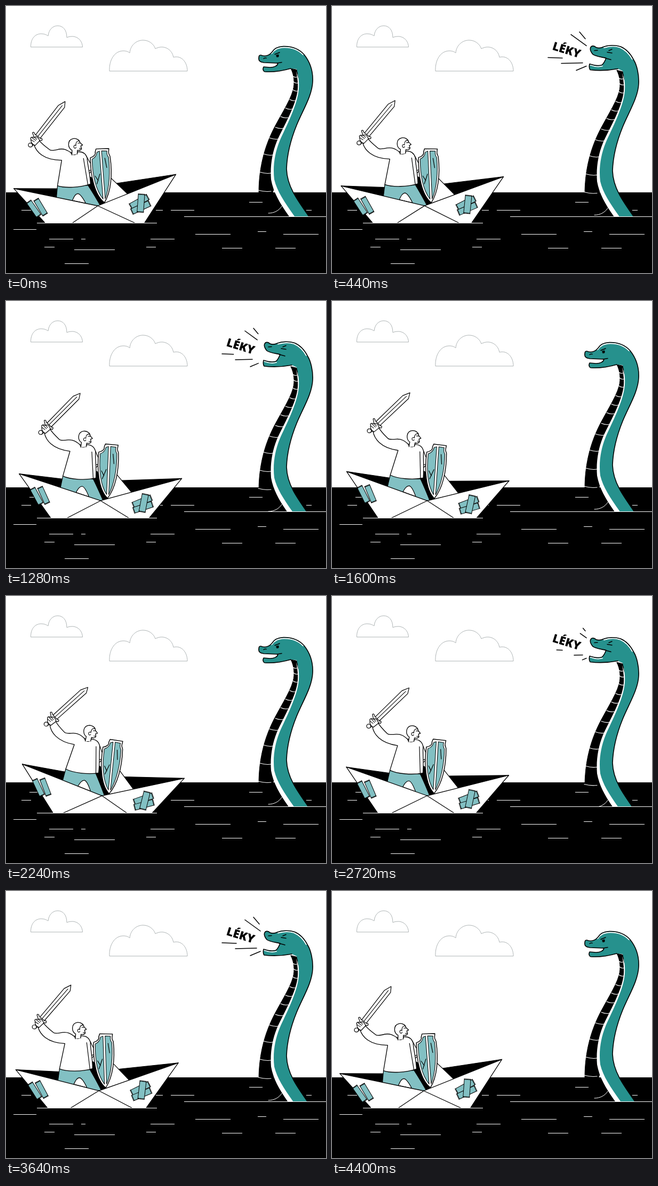
An HTML page with a canvas for the animation above (4440 ms loop, 600 by 500 pixels).

```html
<!DOCTYPE html>
<html lang="cs">
<head>
<meta charset="utf-8">
<title>Paper boat and sea serpent</title>
<style>
html, body { margin: 0; width: 100%; height: 100%; overflow: hidden; background: #fff; }
canvas { display: block; width: 600px; height: 500px; }
</style>
</head>
<body>
<canvas id="stage"></canvas>
<script>
const LOOP = 4440, STEP = 40;
const TEAL = '#26918d', PALE = '#82c0c3', INK = '#000', PAPER = '#fff';

const canvas = document.getElementById('stage');
const dpr = window.devicePixelRatio || 1;
canvas.width = 600 * dpr;
canvas.height = 500 * dpr;
const ctx = canvas.getContext('2d');

function shape(d, fill, stroke, width = 1.4) {
  const p = new Path2D(d);
  if (fill) { ctx.fillStyle = fill; ctx.fill(p); }
  if (stroke) { ctx.strokeStyle = stroke; ctx.lineWidth = width; ctx.stroke(p); }
}
const line = (d, width, color = INK) => shape(d, null, color, width);

function clipAbove(y) {
  ctx.beginPath();
  ctx.rect(0, 0, 600, y);
  ctx.clip();
}

// --- timing ---
function bezierEase(x1, x2, p) {
  let lo = 0, hi = 1, s = p;
  for (let i = 0; i < 24; i++) {
    s = (lo + hi) / 2;
    const x = 3 * x1 * s * (1 - s) ** 2 + 3 * x2 * s * s * (1 - s) + s ** 3;
    if (x < p) lo = s; else hi = s;
  }
  return s * s * (3 - 2 * s);
}

function boatAngle(t) {
  const half = LOOP / 2;
  const k = bezierEase(0.167, 0.69, (t % half) / half);
  return (t < half ? k * 10 - 5 : 5 - k * 10) * Math.PI / 180;
}

const BOB_KEYS = [0, 960, 1920, 2880, 4400];
function bob(t) {
  for (let i = 0; i < 4; i++) {
    if (t <= BOB_KEYS[i + 1]) {
      const p = (t - BOB_KEYS[i]) / (BOB_KEYS[i + 1] - BOB_KEYS[i]);
      const c = 4 * Math.cos(Math.PI * p);
      return i % 2 ? 4 + c : 4 - c;
    }
  }
  return 0;
}

// Time since the roar began, or -1 while the mouth is shut
function roarTime(t) {
  for (const start of [240, 2640]) {
    if (t >= start && t < start + 1200) return t - start;
  }
  return -1;
}

// --- scenery ---
const WAVES = [
  [29, 47, 382], [44, 64, 367], [281, 294, 382], [309, 353, 382], [456, 481, 367],
  [563, 573, 382], [14, 57, 418], [81, 126, 436], [141, 149, 436], [72, 91, 451],
  [128, 204, 456], [110, 155, 482], [271, 316, 436], [263, 281, 451], [355, 421, 427],
  [472, 488, 422], [520, 586, 427], [405, 443, 453], [505, 543, 453]
];

function drawScenery() {
  const grey = '#aeb4b5';
  line('M46.5 76.5C46 62 54 52 66 52C72 52 76 54 79 56C80 45 87 37 97 37C107 37 114 45 114 59C118 57 122 57 126 57C136 58 143 66 143.5 76.5Z', 1, grey);
  line('M194 121.5C193 102 203 84 220 84C226 84 230 86 232 88C233 74 244 64 257 64C268 64 277 71 280 80C295 72 311 80 314 96C328 92 340 104 340 121.5Z', 1, grey);
  ctx.fillStyle = INK;
  ctx.fillRect(0, 349, 600, 151);
  ctx.fillStyle = PAPER;
  for (const [a, b, y] of WAVES) ctx.fillRect(a, y, b - a, 1);
}

// --- boat and sailor ---
// Torn tape: a rectangle with zigzag short ends
function strip(x, y, w, h, deg) {
  ctx.save();
  ctx.translate(x, y);
  ctx.rotate(deg * Math.PI / 180);
  const n = 10;
  let d = '';
  for (const side of [-1, 1]) {
    for (let i = 0; i <= n; i++) {
      const px = side * (i / n - 0.5) * w;
      const py = side * (h / 2 - (i % 2) * 1.8);
      d += `${d ? 'L' : 'M'}${px} ${py}`;
    }
  }
  shape(d + 'Z', PALE, INK, 1);
  ctx.restore();
}

function drawSailor() {
  shape('M104 330L162 334L181 374L156 374L153 365C149 356 145 349 141 348C136 348 133 353 129 361L99 358Z', PALE, INK, 1.2);
  shape('M161 335L166 318L173 322L190 369L181 373Z', INK);
  shape('M158 275C165 278 167 292 170 294L171 306L165 307', PAPER, INK, 1.2);
  // sword
  shape('M71 232L119 180L132 174L130 185L79 239Z', PAPER, INK, 1.2);
  line('M75 235L126 181', 1);
  shape('M67 241L58 250L62 253L71 245Z', PAPER, INK, 1.2);
  ctx.beginPath();
  ctx.arc(60, 249.5, 3.8, 0, 7);
  ctx.fillStyle = PAPER;
  ctx.fill();
  ctx.stroke();
  shape('M66 227C68 225 70 227 70 230L80 239C83 238 84 241 82 243L76 242L68 235Z', PAPER, INK, 1.2);
  // shirt with raised arm
  shape('M67 250C70 263 82 280 116 283L104 330C118 336 146 337 166 332C167 312 163 292 164 283C162 274 156 270 148 270L134 270C128 265 122 261 112 262C106 263 99 264 96 262C88 255 82 250 77 242Z', PAPER, INK, 1.3);
  line('M157 283L161 333M134 270C136 277 146 276 147 270', 1.2);
  shape('M62 239C60 236 64 234 67 236L72 235C75 236 77 239 78 243L69 251C63 249 61 243 62 239Z', PAPER, INK, 1.2);
  line('M62 240L68 244M64 236L71 242M68 235L73 240', 1);
  // head
  shape('M136 275L137 266C129 262 129 246 141 244.5C148 244 153 249 153 253L157.5 258L154 259.5L155 265C153 268 150 268 147 267L146 274', PAPER, INK, 1.3);
  line('M152 250C147 249 145 253 145 258C143 256 140 258 141 261C142 264 145 263 145 261M149 254L153 254M151 264L155 264', 1.1);
}

function drawShield() {
  shape('M182 267.5L206 269L205 275C204 279 207 282 207 284C209 318 203 350 189 369C172 354 167 316 170 283C176 282 181 278 180 273Z', PAPER, INK, 1.4);
  shape('M183 274C182 280 178 284 173 286C171 316 175 345 187 362L188 272Z', PALE, INK, 1);
  shape('M192 272L202 273C201 278 202 282 204 285C205 312 201 342 191 362Z', PALE, INK, 1);
  line('M185 315L178 333M176 318L181 327M197 286L199 304', 1.2);
}

function drawBoat(angle) {
  ctx.save();
  clipAbove(406);
  ctx.translate(177, 419);
  ctx.rotate(angle);
  ctx.translate(-177, -419);
  shape('M22 328L110 336L215 335L327 328L176 374Z', INK, INK, 1.2);
  shape('M181 297L234 357L176 374L120 357Z', PAPER, INK, 1.2);
  drawSailor();
  shape('M22 328L176 374L327 328L243 436H104Z', PAPER, INK, 1.3);
  line('M82 426L176 374L267 426', 1.2);
  drawShield();
  strip(56, 369, 10, 34, -30);
  strip(69, 367, 10, 34, -26);
  strip(254, 373, 11, 38, 66);
  strip(256, 384, 11, 38, 70);
  strip(257, 376, 12, 35, 9);
  ctx.restore();
  ctx.fillStyle = PAPER;
  ctx.fillRect(58, 406, 225, 1);
}

// --- serpent ---
const BACK = 'C571 106 576 124 575 142C574 168 556 196 545 223C534 250 527 275 526 305C527 338 545 362 575 404';
const FRONT = 'H548C525 371 509 350 503 325C500 300 504 275 513 253C524 228 547 185 549 155C550 140 548 130 545 118Z';
const BELLY = 'M534 117C540 128 542 145 538 158C532 180 510 212 498 238C482 272 474 310 474 349L500 349L507 330C500 300 505 275 515 253C526 228 549 185 549 155L546 120Z';
const GAP = 'M544 122C545 130 548 140 547 155C545 185 520 226 508 253C499 275 495 300 497 325C502 352 515 372 538 404L550 404L520 320L530 240L555 160Z';
const SHUT = 'M534 117C520 121 500 124 485 123C482 122 481 118 483 114L495 115C503 115 509 112 510 107L484 106C477 105 473 103 474 97C474 92 476 91 481 93C490 95 495 91 499 86C503 79 509 76 520 75.5C540 75 551 82 559 91';
const OPEN = 'M536 114C520 117 500 118 484 116C482 113 482 109 483 105C492 108 500 109 506 107C510 104 512 99 514 94C505 92 494 91 489 87C485 82 483 78 485 74C487 70 492 71 495 74C500 76 505 75 509 73C517 70 530 69 541 72.5C552 77 560 86 566 98';

// left x, y, width
const SCALES = [
  [537, 131, 9], [539, 142, 9], [538, 157, 10], [532, 175, 12], [524, 191, 13], [515, 207, 14],
  [505, 227, 16], [494, 247, 18], [483, 277, 18], [476, 311, 21], [473, 345, 24]
];

// inner end, outer end
const SPARKS = [
  [475, 58, 464, 45], [477, 71, 448, 50], [432, 94, 405, 93],
  [470, 103, 430, 104], [477, 109, 458, 117]
];

function drawShout() {
  const word = 'LÉKY', room = 54;
  const setSize = px => { ctx.font = `800 ${px}px "Open Sans", "Noto Sans", sans-serif`; };
  ctx.save();
  ctx.translate(412, 78);
  ctx.rotate(0.3);
  ctx.fillStyle = INK;
  ctx.fontStretch = 'condensed';
  setSize(28);
  // a regular-width face needs a smaller size to fit
  const width = ctx.measureText(word).width;
  if (width > room) setSize(28 * room / width);
  ctx.fillText(word, 0, 0);
  ctx.restore();
}

function drawRoar(time) {
  const k = (time % 400) / 200;
  const from = Math.max(0, k - 1), to = Math.min(1, k);
  if (to > from) {
    for (const [x, y, X, Y] of SPARKS) {
      const at = s => (x + (X - x) * s) + ' ' + (y + (Y - y) * s);
      line('M' + at(from) + 'L' + at(to), 1.5);
    }
  }
  drawShout();
}

function drawSerpent(t) {
  const roar = roarTime(t);
  const head = roar < 0 ? SHUT : OPEN;
  ctx.save();
  clipAbove(394);
  ctx.translate(0, bob(t));
  shape(BELLY, INK, INK, 1);
  for (const [x, y, w] of SCALES) {
    line(`M${x} ${y}Q${x + w / 2} ${y + 3.5} ${x + w} ${y + 2}`, 1.1, PAPER);
  }
  line('M492 388C503 388 512 383 517 375', 1, PAPER);
  shape(GAP, PAPER);
  shape(head + BACK + FRONT, TEAL);
  if (roar < 0) {
    shape('M477 105.5L511 107C509 112 503 115 495 115L483 114L482 107Z', PAPER);
    line('M498 89C504 81 510 78 521 77.5C539 77 549 83 557 91', 2, PAPER);
  } else {
    line('M510 74.5C520 71.5 531 71 540 74C551 79 558 87 563 96', 2, PAPER);
    line('M484 107C492 110 500 111 507 109', 1.8, PAPER);
  }
  line(head + BACK, 1.6);
  if (roar < 0) {
    line('M508 107L517 105.5M483 98.5Q485 96.5 488 97.5M504 90.5L513 87', 1.5);
    shape('M507 92L511 91L511 95L508 95.5Z', INK, INK, 1);
  } else {
    line('M512 94L523 97M492 80L498 79.5M516 83L525 84.5M519 80L525 77.5', 1.5);
    drawRoar(roar);
  }
  ctx.restore();
  ctx.fillStyle = PAPER;
  ctx.fillRect(334, 394, 266, 1);
}

function frame(now) {
  const t = Math.floor((now % LOOP) / STEP) * STEP;
  ctx.setTransform(dpr, 0, 0, dpr, 0, 0);
  ctx.fillStyle = PAPER;
  ctx.fillRect(0, 0, 600, 500);
  ctx.lineJoin = 'round';
  ctx.lineCap = 'round';
  drawScenery();
  drawBoat(boatAngle(t));
  drawSerpent(t);
}

const begin = performance.now();
function tick() {
  frame(performance.now() - begin);
  requestAnimationFrame(tick);
}
tick();
</script>
</body>
</html>
```
